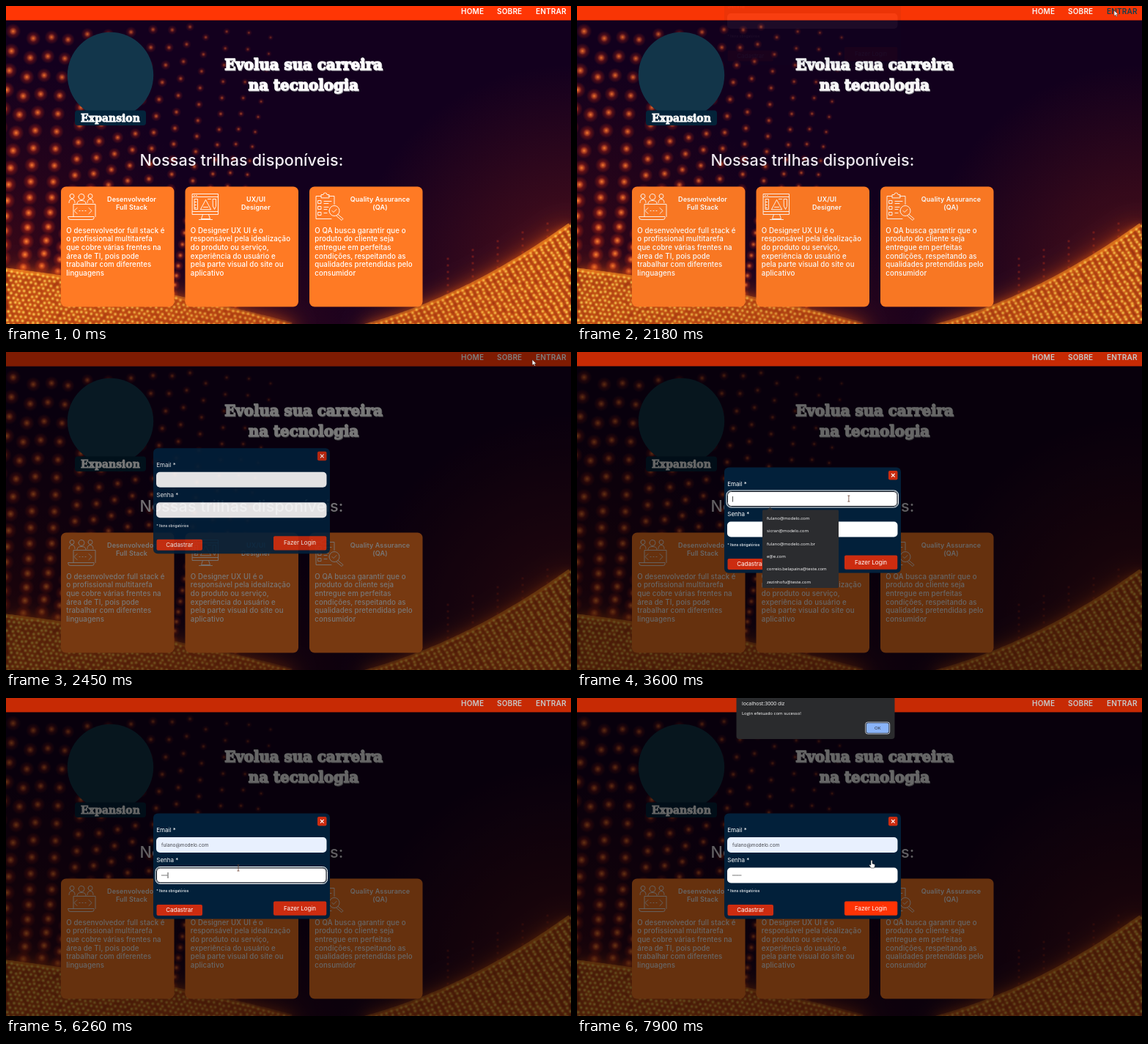
An HTML page with a canvas that plays this animation: 771x434 px, repeating every 8 s.

```html
<!DOCTYPE html>
<html lang="pt-BR">
<head>
<meta charset="utf-8">
<title>Trilhas</title>
<style>
  html, body { margin: 0; width: 100%; height: 100%; overflow: hidden; background: #13001e; }
  canvas, svg { position: absolute; left: 0; top: 0; width: 771px; height: 434px; }
  text { font-family: Inter, sans-serif; fill: #fff; white-space: pre; }
  .mid { text-anchor: middle; }
  .nav { font-size: 10px; font-weight: 600; letter-spacing: .2px; }
  .hero { font: bold 19.8px "DejaVu Serif", serif; stroke: #fff; stroke-width: 1.4px; }
  .shade { fill: #8a8790; stroke: #8a8790; }
  .h2 { font-size: 21.6px; font-weight: 500; letter-spacing: .1px; fill: #f3eef5; }
  .name { font-size: 9px; font-weight: 600; letter-spacing: .1px; }
  .body { font-size: 9.7px; font-weight: 500; letter-spacing: .1px; }
  .form { font-size: 8px; }
  .note { font-size: 4.8px; font-weight: 500; }
  .typed { font-size: 6.6px; fill: #45464c; }
  .sys { font: 6px "Open Sans", sans-serif; }
  .icon { fill: none; stroke: #fff; stroke-width: .9; stroke-linejoin: round; stroke-linecap: round; }
  .btn { fill: #cc2c10; }
  .ring { fill: none; stroke: #fff; stroke-width: 1; }
  .caret { stroke: #222; stroke-width: .8; }
</style>
</head>
<body>
<canvas id="bg" width="771" height="434"></canvas>
<svg id="stage" viewBox="0 0 771 434"></svg>
<script>
const $ = id => document.getElementById(id);
const rand = n => { const s = Math.sin(n * 127.1) * 43758.5453; return s - Math.floor(s); };

/* Glowing dot waves behind the page */
function paintBackground() {
  const c = $('bg').getContext('2d'), W = 771, H = 434;
  const left = x => 360 + .12 * x + .00018 * x * x;
  const right = x => { const d = W - x; return 297 + .72 * d - .0008 * d * d; };

  function glow(x, y, r, rgb, a) {
    const g = c.createRadialGradient(x, y, 0, x, y, r);
    g.addColorStop(0, `rgba(${rgb},${a})`);
    g.addColorStop(.4, `rgba(${rgb},${a * .5})`);
    g.addColorStop(1, `rgba(${rgb},0)`);
    c.fillStyle = g;
    c.fillRect(x - r, y - r, 2 * r, 2 * r);
  }

  c.fillStyle = '#13001e';
  c.fillRect(0, 0, W, H);
  glow(0, 330, 260, '120,20,10', .35);
  glow(771, 380, 300, '150,35,20', .55);
  glow(330, 470, 220, '90,15,25', .5);

  // strings of dots leaning left, dimmer to the right, denser and hotter near the wave
  for (let k = 0; k < 14; k++) {
    const f = 1 - k / 14;
    for (let y = 28 + 20 * rand(k + 1); y < H;) {
      const low = y / H, x = 12 + k * 27 - .13 * y + 4 * Math.sin(y / 60 + k);
      if (y > left(x)) break;
      const r = 3.5 + 7 * f + 2 * low, a = Math.min(1, .2 + .5 * f + .4 * low);
      glow(x, y, r, '215,45,20', a);
      glow(x, y, r * .5, '255,140,55', a);
      y += 27 - 15 * low * low - 5 * (1 - f);
    }
  }
  for (let k = 0; k < 5; k++)
    for (let y = 345 - k * 12; y < right(600 + k * 34); y += 9)
      glow(603 + k * 34, y, 2.5, '190,45,25', .6);

  function wave(edge, from, to, heat) {
    const rim = () => {
      c.beginPath();
      for (let x = from; x <= to; x += 3) c.lineTo(x, edge(x));
    };
    c.save();
    c.shadowColor = '#d8500f';
    c.shadowBlur = 30;
    rim();
    c.lineTo(to, H + 40);
    c.lineTo(from, H + 40);
    c.fillStyle = 'rgba(158,48,16,.85)';
    c.fill();
    c.shadowBlur = 9;
    const g = c.createLinearGradient(from, 0, to, 0);
    for (const s of [0, .5, 1])
      g.addColorStop(s, `rgba(255,150,35,${.65 * heat(from + s * (to - from))})`);
    rim();
    c.strokeStyle = g;
    c.lineWidth = 5;
    c.stroke();
    c.restore();
    // lattice that follows the rim
    for (let j = 0; j < 24; j++)
      for (let x = from + (j * 2.6) % 7; x < to; x += 7) {
        const y = edge(x) + 1 + j * 6, h = heat(x);
        if (y > H + 4) continue;
        const px = x + 2 * rand(x + j * 9), py = y + 2 * rand(x * 3 + j);
        glow(px, py, 5.5, '250,125,25', .3 + .4 * h);
        glow(px, py, 3, '255,220,90', .4 + .6 * h);
      }
  }
  wave(left, 0, 390, x => 1 - x / 520);
  wave(right, 490, 771, x => .5 + (x - 490) / 560);
}

/* Page markup */
const rect = (x, y, w, h, r, attrs) =>
  `<rect x="${x}" y="${y}" width="${w}" height="${h}" rx="${r}" ${attrs}/>`;
const text = (x, y, cls, s, attrs = '') => `<text x="${x}" y="${y}" class="${cls}" ${attrs}>${s}</text>`;
const lines = (x, y, dy, cls, list) => list.map((s, i) => text(x, y + i * dy, cls, s)).join('');
const hero = (y, s) => text(406.7, y + 1, 'hero mid shade', s) + text(406, y, 'hero mid', s);
const icon = d => `<path class="icon" d="${d}"/>`;

const cards = [
  [75, ['Desenvolvedor', 'Full Stack'],
    ['O desenvolvedor full stack é', 'o profissional multitarefa', 'que cobre várias frentes na',
     'área de TI, pois pode', 'trabalhar com diferentes', 'linguagens'],
    'M17 41V24H47V41M10 41H45V43Q45 45 42 45H13Q10 45 10 43ZM22 29l-4 4 4 4M38 29l4 4-4 4M25 33h1M29 33h1M33 33h1' +
    'M11 22q0-5 4-5t4 5M36 22q0-5 4-5t4 5M12 13a3 3 0 1 0 6 0a3 3 0 1 0-6 0M37 13a3 3 0 1 0 6 0a3 3 0 1 0-6 0' +
    'M24 14a4 4 0 1 0 8 0a4 4 0 1 0-8 0M22 23q0-4 6-4t6 4'],
  [244.5, ['UX/UI', 'Designer'],
    ['O Designer UX UI é o', 'responsável pela idealização', 'do produto ou serviço,',
     'experiência do usuário e', 'pela parte visual do site ou', 'aplicativo'],
    'M10 10H45V38H10ZM10 14H45M10 34H45M24 38L22 44H34L32 38M19 45H37M13 17h4v14h-4ZM13 21h2M13 25h2M13 29h2' +
    'M21 31L28 18L35 31ZM25 28h6M38 17h4v10l-2 4-2-4ZM31 17h4M12 12h1M15 12h1'],
  [414, ['Quality Assurance', '(QA)'],
    ['O QA busca garantir que o', 'produto do cliente seja', 'entregue em perfeitas',
     'condições, respeitando as', 'qualidades pretendidas pelo', 'consumidor'],
    'M30 44H9V13H16M26 13H34V24M16 15V11H19a2.5 2.5 0 0 1 5 0H27V15ZM12 19h4v4h-4ZM20 20h10M20 23h6' +
    'M12 27h4v4h-4ZM20 28h6M20 31h4M12 35h4v4h-4ZM20 36h4M27 33a7 7 0 1 0 14 0a7 7 0 1 0-14 0M31 33l2 2 4-4M39 38l7 6-2 2-7-6']
];
const card = ([x, title, body, d]) =>
  rect(x, 246.5, 154.5, 164, 7, 'fill="#ff7a24"') +
  `<g transform="translate(${x} 246.5)">${icon(d)}</g>` +
  lines(x + 96.5, 267.3, 11, 'name mid', title) + lines(x + 7.3, 309.8, 11.6, 'body', body);

const email = 'fulano@modelo.com';
const mails = [email, 'sicran@modelo.com', 'fulano@modelo.com.br', 'e@e.com',
  'correio.belapaina@teste.com', 'zezinhofu@teste.com'];
const field = (y, id) =>
  rect(205, y, 232.5, 21, 5, `id="${id}" fill="#fff"`) +
  `<g id="${id}Focus">${rect(205.5, y + .5, 231.5, 20, 5, 'fill="none" stroke="#10141c"')}
   ${rect(204, y - 1, 234.5, 23, 6, 'class="ring"')}</g>`;

$('stage').innerHTML = `
  ${rect(0, 0, 771, 19.5, 0, 'fill="#ff3605"')}
  ${text(621, 11.3, 'nav', 'HOME')}${text(670, 11.3, 'nav', 'SOBRE')}${text(723, 11.3, 'nav', 'ENTRAR', 'id="enter"')}
  <circle cx="142.5" cy="94.5" r="58.7" fill="#12364b"/>
  ${rect(94, 142.5, 97, 20.5, 4, 'fill="#03243b"')}
  ${text(142.5, 157.5, 'hero mid', 'Expansion', 'style="font-size:14px;stroke-width:.9px"')}
  ${hero(87, 'Evolua sua carreira')}${hero(115, 'na tecnologia')}
  ${text(182.5, 218, 'h2', 'Nossas trilhas disponíveis:')}
  ${cards.map(card).join('')}
  <rect id="dimNav" width="771" height="19.5"/><rect id="dim" y="19.5" width="771" height="414.5"/>
  <g id="modal">
    ${rect(201, 157.5, 241, 144, 6, 'fill="#02203a"')}
    ${rect(425, 162, 12.5, 12.5, 2, 'class="btn"')}
    <path d="M429 166l4.6 4.6m0-4.6l-4.6 4.6" stroke="#fff" stroke-width="1.1"/>
    ${text(205.3, 183.3, 'form', 'Email *')}${field(190, 'mail')}
    ${text(205.3, 224.3, 'form', 'Senha *')}${field(231.5, 'pass')}
    ${text(205.3, 265, 'note', '* Itens obrigatórios')}
    ${rect(205.5, 282, 62.5, 15, 2, 'class="btn"')}${text(236.7, 292.3, 'form mid', 'Cadastrar')}
    ${rect(365, 277.5, 72.3, 19.3, 2, 'class="btn" id="login"')}${text(401, 289.8, 'form mid', 'Fazer Login')}
    ${text(212, 203.2, 'typed', email, 'id="address"')}
    <path id="dots" stroke="#333" stroke-width=".9"/>
    <path id="mailCaret" class="caret" d="M212.5 197v7.5"/>
    <path id="passCaret" class="caret" d="M0 238v8"/>
  </g>
  <g id="list">
    <path d="M259 216l4.5-4 4.5 4z" fill="#2b2c2f"/>
    ${rect(253, 215.5, 104, 106.5, 1.5, 'fill="#2b2c2f"')}
    ${rect(253, 218, 104, 17.3, 0, 'id="hover" fill="#46474b"')}
    ${lines(259, 229, 17.35, 'sys', mails)}
  </g>
  <g id="alert">
    ${rect(217.5, -6, 216, 62, 4, 'fill="#2a2b2d"')}
    ${text(225, 9.7, 'sys', 'localhost:3000 diz', 'style="font-size:7px"')}
    ${text(225, 23, 'sys', 'Login efetuado com sucesso!')}
    ${rect(393.7, 33, 33, 16, 3, 'fill="none" stroke="#dce8fc" stroke-width=".8"')}
    ${rect(395, 34.3, 30.4, 13.4, 2, 'fill="#8ab4f8"')}
    ${text(410.2, 43.2, 'sys mid', 'OK', 'style="fill:#202124"')}
  </g>
  <g id="cursor">
    <path id="arrow" d="M0 0V7.5L1.9 5.9 3.1 8.5 4.3 8 3.1 5.4H5.4Z" fill="#fff" stroke="#111" stroke-width=".4"/>
    <path id="beam" d="M-1.5-4H1.5M0-4V4M-1.5 4H1.5" stroke="#6a3f30" stroke-width=".8"/>
    <path id="hand" d="M-1 0Q0-1.3 1 0V4L4 5Q5 5.4 4.6 7L3.6 10H-.8L-3.2 6.2Q-3.2 5-1 6Z" fill="#fff" stroke="#111" stroke-width=".5"/>
  </g>`;

/* Motion */
const path = [[190, 754, 406], [810, 686, 204], [1070, 686, 204], [1450, 757, 90], [1820, 733, 6],
  [2310, 733, 6], [2450, 719, 10], [2660, 541, 117], [2900, 420, 235], [3130, 371, 200], [3600, 371, 200],
  [4010, 317, 230], [4160, 317, 230], [4400, 317, 232], [6660, 317, 232], [7000, 449, 270],
  [7420, 402, 284], [7550, 402, 284], [7900, 402, 222]];
const keys = [5300, 5450, 5620, 6130, 6660, 6760];

function cursorAt(t) {
  const i = path.findIndex(p => p[0] > t);
  if (i < 1) return path[i < 0 ? path.length - 1 : 0].slice(1);
  const [a, b] = [path[i - 1], path[i]], f = (t - a[0]) / (b[0] - a[0]);
  return [a[1] + (b[1] - a[1]) * f, a[2] + (b[2] - a[2]) * f];
}

// the CSS "ease" curve, solved by bisection
function ease(x) {
  if (x <= 0 || x >= 1) return x <= 0 ? 0 : 1;
  let lo = 0, hi = 1, s;
  for (let i = 0; i < 20; i++) {
    s = (lo + hi) / 2;
    if (.75 * s * (1 - s) + s ** 3 < x) lo = s; else hi = s;
  }
  return .3 * s * (1 - s) ** 2 + 3 * s * s * (1 - s) + s ** 3;
}

const show = (id, on) => $(id).style.display = on ? '' : 'none';
const within = (t, a, b) => t >= a && t < b;
const blink = (t, start) => (t - start) % 1060 < 530;

function draw(t) {
  const e = ease((t - 2150) / 500);
  $('dim').style.opacity = .6 * e;
  $('dimNav').style.opacity = t < 2600 ? .57 * e : .22;
  $('modal').style.opacity = e;
  $('modal').setAttribute('transform', `translate(0 ${-232 * (1 - e)})`);
  $('enter').style.fill = within(t, 1820, 2250) ? '#12424f' : '#fff';

  const picked = t >= 4160, onMail = within(t, 3270, 4500), onPass = within(t, 4500, 7420);
  $('mail').setAttribute('fill', picked ? '#e8f0fe' : '#fff');
  show('address', picked);
  show('mailFocus', onMail);
  show('passFocus', onPass);
  show('mailCaret', within(t, 3300, 4160) && blink(t, 3300));
  show('list', within(t, 3330, 4200));
  show('hover', t >= 3850);

  const typed = keys.filter(k => k <= t), n = typed.length;
  $('dots').setAttribute('d', typed.map((_, i) => `M${212.2 + i * 2.1} 242h1.5`).join(''));
  $('passCaret').setAttribute('transform', `translate(${212.6 + n * 2.1} 0)`);
  show('passCaret', onPass && (t - typed[n - 1] < 500 || blink(t, 4500)));

  $('login').style.fill = t >= 7250 ? '#ff3305' : '#cc2c10';
  show('alert', t >= 7490);

  const kind = t >= 7250 ? 'hand' : within(t, 3060, 3720) || within(t, 4300, 6740) ? 'beam' : 'arrow';
  for (const k of ['arrow', 'beam', 'hand']) show(k, k === kind);
  show('cursor', t >= 190);
  $('cursor').setAttribute('transform', `translate(${cursorAt(t)})`);
}

paintBackground();
const start = performance.now();
function tick() {
  draw((performance.now() - start) % 8000);
  requestAnimationFrame(tick);
}
tick();
</script>
</body>
</html>
```
